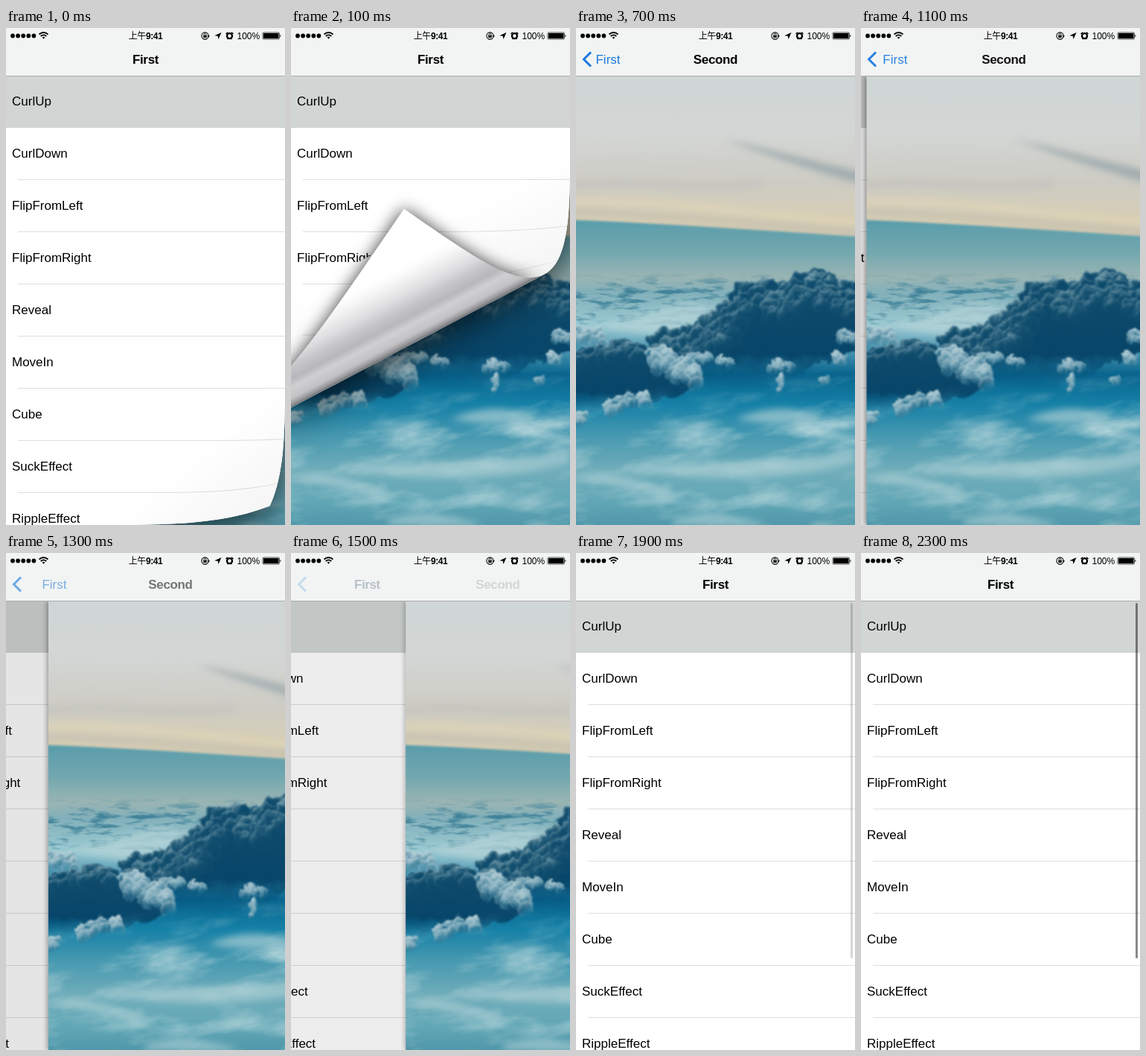
These frames come from a looping animation (375x667 px, 2400 ms). An HTML page with a canvas:

```html
<!DOCTYPE html>
<html lang="en">
<head>
<meta charset="utf-8">
<title>Page curl and swipe back</title>
<style>
@property --p { syntax: '<number>'; inherits: true; initial-value: 0; }

html, body { margin: 0; width: 100%; height: 100%; overflow: hidden; background: #fff; }
#stage {
  position: relative; width: 375px; height: 667px; overflow: hidden; background: #fff;
  font: 17px "Liberation Sans", "Noto Sans CJK SC", sans-serif; color: #000;
  animation: pop 2400ms step-end -16ms infinite;
}
#stage > *, .list, .bar, .bar > * { position: absolute; left: 0; top: 0; }
#view { --q: calc(1 - var(--p)); width: 375px; height: 667px; }
#view > * { position: absolute; }

.list { top: 64px !important; width: 375px; height: 603px; overflow: hidden; background: #fff; }
.row { position: relative; height: 70px; line-height: 70px; padding-left: 8px; }
.row:first-child { background: #d1d5d3; }
.row:not(:first-child)::after {
  content: ""; position: absolute; left: 16px; right: 0; bottom: 0; height: 1px; background: #dcdedd;
}
#view .list { transform: translateX(calc(var(--q) * -112.5px)); }
#dim { inset: 64px 0 0; background: #000; opacity: calc(var(--q) * .12); }
#photo {
  left: 0; top: 65px; width: 375px; height: 602px; will-change: transform;
  transform: translateX(calc(var(--p) * 375px));
  box-shadow: -2px 0 6px rgb(0 0 0 / calc(var(--q) * .4));
}
#photo svg { display: block; }

.bar { width: 375px; height: 64px; background: #f1f4f3; border-bottom: 1px solid #a9adab; }
.bar > * { top: 32px; width: 375px; line-height: 22px; text-align: center; }
.title { font-weight: bold; letter-spacing: -.35px; }
.back { color: #1879e0; }
#view .back, #view .first { transform: translateX(calc(var(--q) * -144.5px)); }
.back { opacity: calc(var(--q) * var(--q) * var(--q) * var(--q)); }
#view .first { opacity: calc(var(--p) * var(--p)); }
.second {
  transform: translateX(calc(var(--p) * 220px));
  opacity: calc(var(--q) * var(--q) * var(--q) * var(--q));
}
.bar > .chevron { top: 30px; left: 6px; width: 18px; height: 24px; opacity: calc(var(--q) * var(--q) * var(--q)); }

#thumb {
  left: 369px; top: 67px; width: 3px; height: 477px; border-radius: 2px; background: #000; opacity: 0;
  animation: flash 2400ms step-end -16ms infinite;
}
#sheet { width: 375px; height: 667px; }
#status { width: 375px; height: 20px; }

@keyframes pop {
  0% { --p: 0; }
  45.833% { --p: .02; }
  50% { --p: .065; }
  54.167% { --p: .152; }
  58.333% { --p: .275; }
  62.5% { --p: .411; }
  66.667% { --p: .57; }
  70.833% { --p: .8; }
  75% { --p: .95; }
  79.167%, 100% { --p: 1; }
}
@keyframes flash {
  0% { opacity: 0; }
  79.167% { opacity: .16; }
  83.333% { opacity: .32; }
  87.5%, 99.9% { opacity: .46; }
  100% { opacity: 0; }
}
</style>
</head>
<body>
<div id="stage">
  <div id="view">
    <div class="list"></div>
    <div id="dim"></div>
    <div id="thumb"></div>
    <div id="photo">
      <svg width="375" height="602" viewBox="0 65 375 602" color-interpolation-filters="sRGB">
        <defs>
          <linearGradient id="sky" x2="0" y2="1">
            <stop offset="0" stop-color="#cfd6d6"/>
            <stop offset=".35" stop-color="#d3d6d4"/>
            <stop offset=".65" stop-color="#cdccc4"/>
            <stop offset=".88" stop-color="#d8ceb4"/>
            <stop offset="1" stop-color="#cdc4ad"/>
          </linearGradient>
          <linearGradient id="sea" gradientUnits="userSpaceOnUse" x1="0" y1="262" x2="0" y2="667">
            <stop offset="0" stop-color="#5b9dab"/>
            <stop offset=".1" stop-color="#74a8af"/>
            <stop offset=".18" stop-color="#9ab5b3"/>
            <stop offset=".23" stop-color="#82b0ba"/>
            <stop offset=".34" stop-color="#9ccad2"/>
            <stop offset=".42" stop-color="#4b96b2"/>
            <stop offset=".5" stop-color="#08648d"/>
            <stop offset=".6" stop-color="#1580a6"/>
            <stop offset=".7" stop-color="#4598b0"/>
            <stop offset=".82" stop-color="#70adba"/>
            <stop offset=".92" stop-color="#62a7b6"/>
            <stop offset="1" stop-color="#4f97aa"/>
          </linearGradient>
          <linearGradient id="dark" x2="0" y2="1">
            <stop offset="0" stop-color="#245b76"/>
            <stop offset=".3" stop-color="#0d496a"/>
            <stop offset=".7" stop-color="#07466a"/>
            <stop offset="1" stop-color="#07608a" stop-opacity="0"/>
          </linearGradient>
          <linearGradient id="mist" x2="0" y2="1">
            <stop offset="0" stop-color="#fff" stop-opacity="0"/>
            <stop offset=".35" stop-color="#fff"/>
            <stop offset="1" stop-color="#fff" stop-opacity=".6"/>
          </linearGradient>
          <radialGradient id="shade" cx=".58" cy=".72" r=".75">
            <stop offset="0" stop-color="#0b486a"/>
            <stop offset=".62" stop-color="#114d6d"/>
            <stop offset=".84" stop-color="#3d7188"/>
            <stop offset="1" stop-color="#a3bfc9"/>
          </radialGradient>
          <radialGradient id="lit" cx=".55" cy=".8" r=".8">
            <stop offset="0" stop-color="#1d6788" stop-opacity=".3"/>
            <stop offset=".5" stop-color="#5d93a9"/>
            <stop offset="1" stop-color="#c2d8dd"/>
          </radialGradient>
          <filter id="soft" x="-30%" y="-80%" width="160%" height="260%"><feGaussianBlur stdDeviation="5"/></filter>
          <filter id="edge" x="-5%" y="-5%" width="110%" height="110%"><feGaussianBlur stdDeviation="1.500"/></filter>
          <filter id="puff" x="-10%" y="-20%" width="120%" height="140%">
            <feTurbulence type="fractalNoise" baseFrequency=".08" numOctaves="3" seed="4"/>
            <feDisplacementMap in="SourceGraphic" scale="13" xChannelSelector="R" yChannelSelector="G"/>
            <feGaussianBlur stdDeviation=".8"/>
          </filter>
          <filter id="wisp" x="0" y="0" width="1" height="1">
            <feTurbulence type="fractalNoise" baseFrequency=".010 .030" numOctaves="5" seed="9"/>
            <feColorMatrix values="0 0 0 0 .7  0 0 0 0 .83  0 0 0 0 .85  2.4 0 0 0 -1.05"/>
            <feComposite in2="SourceGraphic" operator="in"/>
          </filter>
          <filter id="flock" x="0" y="0" width="1" height="1">
            <feTurbulence type="fractalNoise" baseFrequency=".035 .14" numOctaves="4" seed="2"/>
            <feColorMatrix values="0 0 0 0 .25  0 0 0 0 .51  0 0 0 0 .6  4 0 0 0 -1.9"/>
            <feComposite in2="SourceGraphic" operator="in"/>
          </filter>
        </defs>
        <path fill="url(#sky)" d="M0 65H375V285H0Z"/>
        <g filter="url(#soft)" fill="none" stroke-width="7">
          <path fill="#a2adaf" d="M200 150C270 164 320 180 390 194V212C320 192 260 172 200 150Z"/>
          <path stroke="#c2c3bd" d="M-10 212C90 200 150 222 250 208"/>
          <path stroke="#dfd5b8" d="M-10 234C120 228 240 250 385 264"/>
          <path stroke="#c3bfb0" d="M-10 246C100 250 230 260 385 273"/>
        </g>
        <path fill="url(#sea)" filter="url(#edge)" d="M-20 257C120 262 250 272 395 281V690H-20Z"/>
        <path fill="url(#mist)" filter="url(#flock)" d="M0 328H375V398H0Z"/>
        <path fill="#b2d2d7" opacity=".8" filter="url(#soft)" d="M30 400L150 368 210 380 100 412Z"/>
        <g filter="url(#puff)">
          <path class="crest" data-size="9" data-rows="2" data-fill="lit" fill="none" d="M-6 402C10 398 24 398 34 406"/>
          <path fill="url(#dark)" d="M100 432C102 410 124 402 142 408C156 394 178 382 206 388
            C204 366 220 346 240 340C254 336 262 350 284 346C296 330 314 320 332 334C350 334 366 344 385 350V435
            C360 430 345 454 318 450C295 484 190 492 150 484Z"/>
          <path class="crest" data-size="13" data-rows="4" data-fill="shade" fill="none"
            d="M104 412L125 400 145 402 165 389 185 379 204 377 208 358 232 337 243 333 260 339 280 338 300 329 314 321 330 326 345 334 380 343"/>
          <path fill="url(#dark)" d="M-5 436C15 422 30 432 48 422S80 420 98 430C130 426 160 440 170 466
            C150 500 120 490 100 506L-5 520Z"/>
          <path class="crest" data-size="11" data-rows="2" data-fill="shade" fill="none" d="M-5 432L20 425 45 421 65 415 95 424"/>
          <path class="crest" data-size="10" data-rows="3" data-fill="lit" fill="none" d="M104 427L122 428 138 437 160 451"/>
          <path class="crest" data-size="6" data-rows="2" data-fill="lit" fill="none" d="M152 435L178 434M192 438L208 440M262 446L290 446M354 405L375 408M346 434L360 437"/>
          <path class="crest" data-size="5" data-rows="2" data-fill="lit" fill="none" d="M274 462L272 482M332 466L340 468"/>
          <path class="crest" data-size="8" data-rows="2" data-fill="lit" fill="none" d="M0 514L16 514M40 502L64 490 98 487"/>
        </g>
        <path fill="url(#mist)" filter="url(#wisp)" transform="rotate(-8 187 570)" d="M-40 470H420V700H-40Z"/>
        <g filter="url(#soft)" fill="#a9cdd3" opacity=".7">
          <path d="M215 525C250 508 290 508 320 518S300 540 215 525Z"/>
          <path d="M60 590C160 578 270 590 375 566V584C260 612 150 606 60 590Z"/>
          <path d="M0 602C40 590 100 612 130 624S50 616 0 602Z"/>
          <path d="M130 660C170 646 230 656 260 667H130Z"/>
        </g>
      </svg>
    </div>
    <div class="bar">
      <svg class="chevron" viewBox="6 30 18 24"><path d="M20 32.500L10.500 42 20 51.500" fill="none" stroke="#1879e0" stroke-width="3"/></svg>
      <span class="back">First</span>
      <span class="title first">First</span>
      <span class="title second">Second</span>
    </div>
  </div>

  <div id="sheet">
    <div class="list"></div>
    <div class="bar"><span class="title">First</span></div>
  </div>
  <canvas id="curl" width="375" height="667"></canvas>

  <svg id="status" viewBox="0 0 375 20">
    <path d="M9 10.500H38" stroke="#000" stroke-width="5.800" stroke-linecap="round" stroke-dasharray="0 7.100"/>
    <g fill="none" stroke="#000" stroke-width="1.800">
      <path d="M44.500 8.500Q50.500 3.500 56.500 8.500M46.700 11Q50.500 7.700 54.300 11"/>
      <circle cx="267.500" cy="10.500" r="4.600" stroke-width="1.100"/>
      <path d="M266 10V8.800A1.500 1.500 0 0 1 269 8.800V10" stroke-width=".9"/>
      <circle cx="300.500" cy="10.700" r="3.500" stroke-width="2.300"/>
      <path d="M295.500 8L298 5.700M305.500 8L303 5.700M297.500 15L298.500 14M303.500 15L302.500 14" stroke-width="1.400"/>
      <rect x="345" y="6" width="22.500" height="9" rx="1.500" stroke-width=".7"/>
    </g>
    <path d="M48.600 12.600Q50.500 11 52.400 12.600L50.500 14.800ZM265.300 9.800H269.700V13H265.300ZM270.500 10H274L272.300 12.500ZM289.500 6L285.500 15 284.700 10.800 280.300 10.200ZM346 7H366.500V14H346ZM368.500 8.700Q370.500 10.500 368.500 12.300Z"/>
    <text x="187.500" y="14.500" font-size="12" font-weight="bold" text-anchor="middle" letter-spacing="-.4"><tspan font-weight="500">上午</tspan>9:41</text>
    <text x="310.500" y="14.500" font-size="12">100%</text>
  </svg>
</div>

<script>
const W = 375, H = 667, R = 130, LOOP = 2400, STEP = 100;
const names = ['CurlUp', 'CurlDown', 'FlipFromLeft', 'FlipFromRight', 'Reveal', 'MoveIn', 'Cube', 'SuckEffect', 'RippleEffect'];
const sheet = document.getElementById('sheet');
const ctx = document.getElementById('curl').getContext('2d');

for (const list of document.querySelectorAll('.list')) {
  for (const name of names) {
    const row = document.createElement('div');
    row.className = 'row';
    row.textContent = name;
    list.append(row);
  }
}

let seed = 7;
const rand = () => (seed = seed * 16807 % 2147483647) / 2147483647;

// Heaps round puffs below each crest line, fainter with every row.
for (const crest of document.querySelectorAll('.crest')) {
  const size = +crest.dataset.size, rows = +crest.dataset.rows, length = crest.getTotalLength();
  for (let row = 0; row < rows; row++) {
    for (let at = 0; at <= length; at += size * .75) {
      const { x, y } = crest.getPointAtLength(at);
      const r = size * (.55 + rand() * .6);
      const puff = document.createElementNS('http://www.w3.org/2000/svg', 'circle');
      const attrs = {
        cx: x + (rand() - .5) * size, cy: y + r + row * size * .9 + (rand() - .5) * size * .4, r,
        fill: `url(#${crest.dataset.fill})`, opacity: 1 - .7 * row / rows
      };
      for (const key in attrs) puff.setAttribute(key, attrs[key]);
      crest.before(puff);
    }
  }
}

const mix = (a, b, k) => a.map((v, i) => v + (b[i] - v) * k);

// Keeps the part of a polygon where f >= 0.
const cut = (poly, f) => poly.flatMap((a, i) => {
  const b = poly[(i + 1) % poly.length], u = f(a), v = f(b);
  const kept = u >= 0 ? [a] : [];
  if (u * v < 0) kept.push(mix(a, b, u / (u - v)));
  return kept;
});

const band = (y0, y1, x0 = 0) => [[x0, y0], [W, y0], [W, y1], [x0, y1]];

// The page wraps round a cylinder of radius R that starts at distance s0 along n.
function drawCurl(k) {
  const angle = .677 - .193 * k;
  const n = [Math.sin(angle), Math.cos(angle)];
  const s0 = k < 2 ? 602 - 281 * k : 40 - 165 * (k - 2);
  const dist = ([x, y]) => x * n[0] + y * n[1] - s0;
  const slice = (poly, lo, hi) => cut(cut(poly, p => dist(p) - lo), p => hi - dist(p));
  const bend = p => {
    const d = dist(p);
    if (d <= 0) return p;
    const e = d < Math.PI * R ? R * Math.sin(d / R) : Math.PI * R - d;
    return [p[0] + n[0] * (e - d), p[1] + n[1] * (e - d)];
  };
  const fill = (poly, style) => {
    ctx.beginPath();
    poly.forEach((a, i) => {
      const b = poly[(i + 1) % poly.length];
      for (let j = 0; j < 24; j++) ctx.lineTo(...bend(mix(a, b, j / 24)));
    });
    ctx.fillStyle = style;
    ctx.fill();
  };
  const ramp = (from, to, stops) => {
    const g = ctx.createLinearGradient(n[0] * from, n[1] * from, n[0] * to, n[1] * to);
    for (const [at, color] of stops) g.addColorStop(at, color);
    return g;
  };
  const shadow = (color, blur, dy) => Object.assign(ctx, { shadowColor: color, shadowBlur: blur, shadowOffsetY: dy });

  const flat = cut(band(0, H), p => -dist(p));
  sheet.style.clipPath = flat.length
    ? `polygon(${flat.map(([x, y]) => `${x}px ${y}px`).join()})`
    : 'inset(100%)';

  const crest = Math.PI * R / 2;
  const lip = poly => slice(poly, -1, crest);

  // Shadow on the picture below, kept off the flat part of the page.
  ctx.save();
  ctx.beginPath();
  cut([[-99, -99], [W + 99, -99], [W + 99, H + 99], [-99, H + 99]], dist).forEach(p => ctx.lineTo(...p));
  ctx.clip();
  shadow('rgba(0,0,0,.8)', 52, 8);
  fill(lip(band(0, H)), '#fff');
  ctx.restore();

  fill(lip(band(0, 64)), '#f1f4f3');
  fill(lip(band(64, 134)), '#d1d5d3');
  fill(lip(band(134, H)), '#fff');
  fill(lip(band(64, 65)), '#a9adab');
  for (let y = 203; y < H; y += 70) fill(lip(band(y, y + 1, 16)), '#dcdedd');
  fill(lip(band(0, H)), ramp(s0, s0 + R, [[0, 'rgba(0,0,0,0)'], [1, 'rgba(0,0,0,.04)']]));

  ctx.save();
  shadow('rgba(0,0,0,.75)', 22, 0);
  ctx.beginPath();
  cut([[-99, -99], [W + 99, -99], [W + 99, H + 99], [-99, H + 99]], p => R - dist(p)).forEach(p => ctx.lineTo(...p));
  ctx.clip();
  fill(slice(band(0, H), crest, 1e4), ramp(s0 + R, s0, [
    [0, '#707174'], [.03, '#98989c'], [.08, '#c2c2c5'], [.18, '#d0d0d3'], [.26, '#b8b8bc'],
    [.36, '#c5c5c9'], [.48, '#dedee0'], [.6, '#efeff0'], [.7, '#fbfbfb'], [.76, '#fff']
  ]));
  ctx.restore();
}

const start = performance.now();
let last = -1;

function tick() {
  const t = (performance.now() - start + 16) % LOOP;
  const k = Math.floor(t / STEP);
  if (k !== last) {
    last = k;
    const curling = k < 4;
    sheet.style.display = curling ? 'block' : 'none';
    ctx.clearRect(0, 0, W, H);
    if (curling) drawCurl(k);
  }
  requestAnimationFrame(tick);
}
tick();
</script>
</body>
</html>
```
